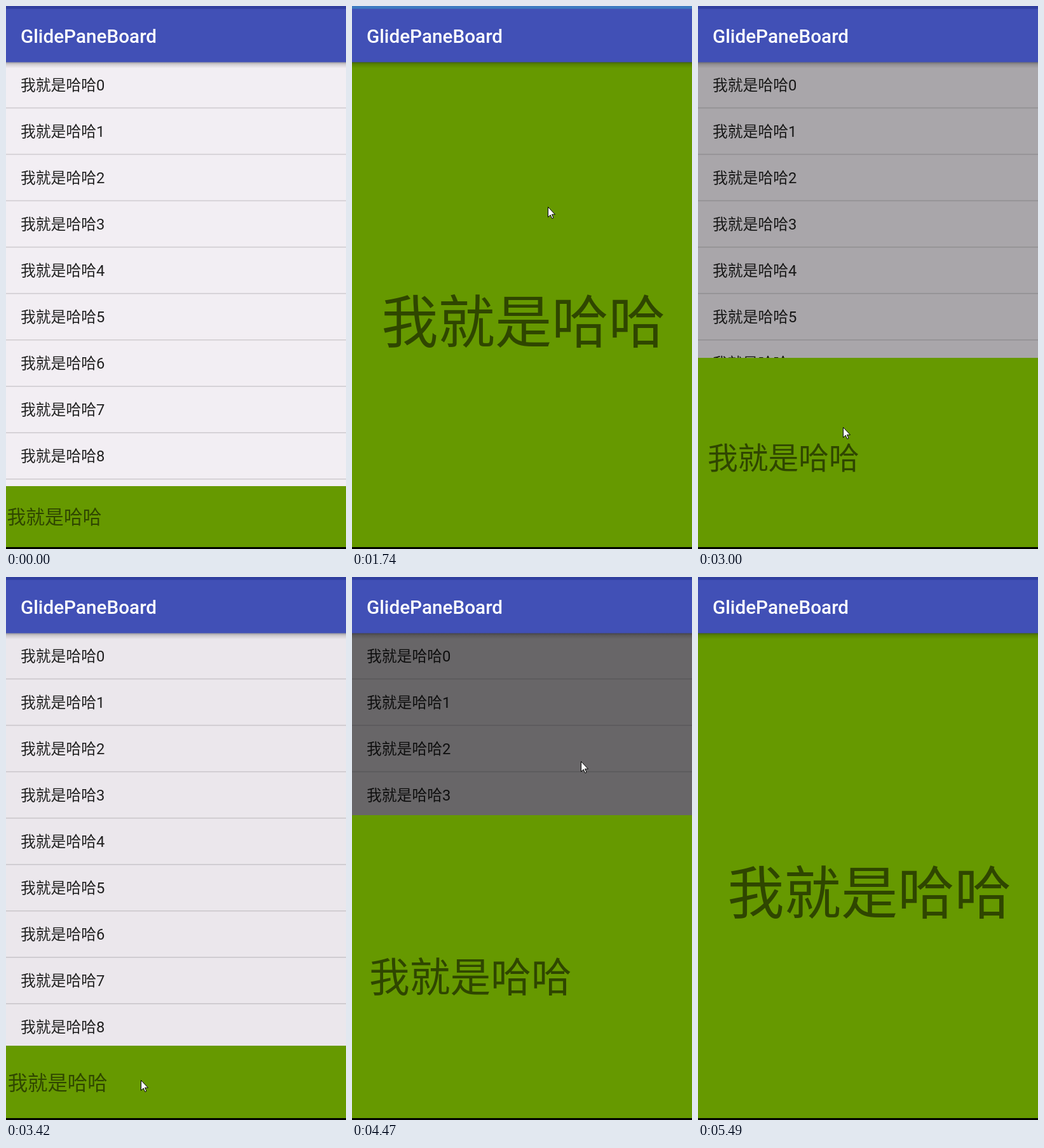
Recreate the animation shown at these times as an HTML page. Size 535 px wide and 855 px high, loop 5940 ms.

```html
<!DOCTYPE html>
<html lang="zh">
<head>
<meta charset="utf-8">
<title>Sheet</title>
<style>
  html, body { margin: 0; width: 100%; height: 100%; overflow: hidden; background: #000; }
  svg { display: block; width: 100vw; height: 100vh; }
  text { font-family: Roboto, "Noto Sans CJK SC", "Noto Sans CJK", sans-serif; }
</style>
</head>
<body>
<svg viewBox="0 0 535 855" lang="zh-CN">
  <defs>
    <linearGradient id="fade" x1="0" y1="0" x2="0" y2="1">
      <stop offset="0" stop-color="#000" stop-opacity=".36"/>
      <stop offset=".4" stop-color="#000" stop-opacity=".13"/>
      <stop offset="1" stop-color="#000" stop-opacity="0"/>
    </linearGradient>
  </defs>
  <rect width="535" height="855" fill="#f2eef3"/>
  <g id="list" font-size="23.8" fill="#212121"></g>
  <rect id="dim" y="88" width="535" height="764"/>
  <rect id="panel" width="535" fill="#690"/>
  <text id="label" fill="#000" fill-opacity=".54">我就是哈哈</text>
  <rect y="88" width="535" height="10" fill="url(#fade)"/>
  <rect width="535" height="88.5" fill="#4150b6"/>
  <rect id="status" width="535" height="4.5"/>
  <text x="23" y="58" font-size="29.7" font-weight="500" fill="#fff">GlidePaneBoard</text>
  <rect y="852" width="535" height="3"/>
  <path id="cursor" d="M.5 .5V16.5L4.2 13L6.8 18.6L9 17.6L6.5 12.2H11.5Z" fill="#fff" stroke="#000"/>
</svg>
<script>
const LOOP = 5940, STEP = 30;
const OPEN = 88, CLOSED = 756, BOTTOM = 852;
const $ = id => document.getElementById(id);
const mix = (a, b, u) => a + (b - a) * u;

// A move slows down towards its end; a higher power slows it more.
function progress(t, start, end, power = 1) {
  const u = Math.min(1, Math.max(0, (t - start) / (end - start)));
  return 1 - (1 - u) ** power;
}

const panelMoves = [
  { start: 1080, end: 1680, to: OPEN, power: 2 },
  { start: 2310, end: 3510, to: CLOSED, power: 1.4 },
  { start: 4083, end: 4770, to: 193, power: 1.36 },
  { start: 4980, end: 5490, to: OPEN, power: 2 }
];

const pointerMoves = [
  { start: 60, end: 300, x: 218, y: 826 },
  { start: 480, end: 840, x: 219, y: 816 },
  { start: 1140, end: 1740, x: 308, y: 316 },
  { start: 1740, end: 1980, x: 296, y: 134 },
  { start: 1980, end: 2220, x: 285, y: 196 },
  { start: 2310, end: 3510, x: 211, y: 799, power: 1.74 },
  { start: 3540, end: 3960, x: 258, y: 799 },
  { start: 4005, end: 4770, x: 393, y: 126, power: 1.51 },
  { start: 4980, end: 5460, x: 536, y: 60 }
];

function panelTop(t) {
  return panelMoves.reduce(
    (top, m) => mix(top, m.to, progress(t, m.start, m.end, m.power)), CLOSED);
}

function pointer(t) {
  return pointerMoves.reduce((at, m) => {
    const u = progress(t, m.start, m.end, m.power);
    return { x: mix(at.x, m.x, u), y: mix(at.y, m.y, u) };
  }, { x: 514, y: 157 });
}

function set(el, attrs) {
  for (const name in attrs) el.setAttribute(name, attrs[name]);
}

function add(parent, tag, attrs, content = '') {
  const el = document.createElementNS('http://www.w3.org/2000/svg', tag);
  set(el, attrs);
  el.textContent = content;
  parent.appendChild(el);
}

for (let i = 0; i < 9; i++) {
  const y = 73.05 * i;
  add($('list'), 'text', { x: 23, y: 133 + y }, '我就是哈哈' + i);
  add($('list'), 'rect', { y: 159.7 + y, width: 535, height: 1.6, fill: '#d0ccd1' });
}

function draw(t) {
  const top = panelTop(t);
  const k = (CLOSED - top) / (CLOSED - OPEN);
  const size = 29.8 * (1 + 2 * k);
  set($('dim'), { 'fill-opacity': k });
  set($('panel'), { y: Math.round(top), height: BOTTOM - Math.round(top) });
  set($('label'), {
    x: 1.5 + 44.7 * k,
    y: 804 - 308.3 * k + 0.38 * size,
    'font-size': size
  });
  set($('status'), { fill: t >= 480 && t < 2340 ? '#3c7bc1' : '#303f9f' });

  const { x, y } = pointer(t);
  set($('cursor'), {
    transform: `translate(${Math.round(x)} ${Math.round(y)})`,
    visibility: t >= 60 && t < 5460 ? 'visible' : 'hidden'
  });
}

const start = performance.now();
function tick() {
  const t = (performance.now() - start) % LOOP;
  draw(Math.floor(t / STEP) * STEP);
  requestAnimationFrame(tick);
}
draw(0);
requestAnimationFrame(tick);
</script>
</body>
</html>
```
